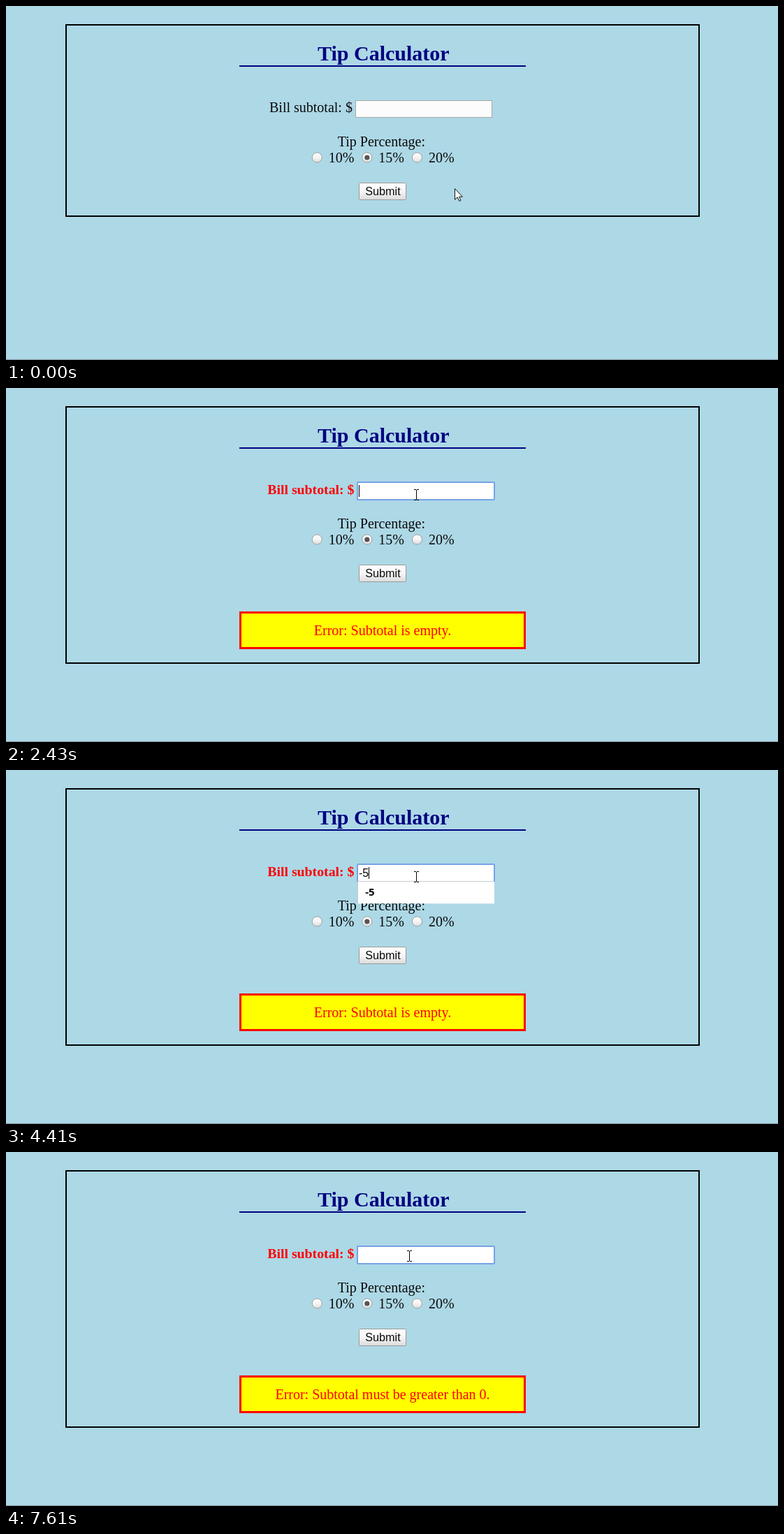
Recreate the animation shown at these times as an HTML page. Size 1105 by 507 pixels, loop 8 s.

```html
<!DOCTYPE html>
<html lang="en">
<head>
<meta charset="utf-8">
<title>Tip Calculator</title>
<style>
  html, body { margin: 0; height: 100%; overflow: hidden; background: #add8e6; }
  svg { display: block; width: 1105px; height: 507px; }
  text { font: 20px "Liberation Serif", serif; fill: #0a0a0a; white-space: pre; }
  .title { font-size: 30px; font-weight: bold; fill: #000080; }
  .sans { font: 16px "Liberation Sans", sans-serif; }
  .option { font: bold 15px "Open Sans", sans-serif; fill: #000; }
  .bad { font-size: 19.8px; font-weight: bold; fill: #f00; }
  .error { fill: #f00; text-anchor: middle; }
</style>
</head>
<body>
<svg viewBox="0 0 1105 507">
  <defs>
    <linearGradient id="face" x2="0" y2="1">
      <stop offset="0" stop-color="#fff"/>
      <stop offset=".5" stop-color="#f5f5f5"/>
      <stop offset="1" stop-color="#dcdcdc"/>
    </linearGradient>
  </defs>
  <rect y="506" width="1105" height="1" fill="#84929a"/>
  <rect id="panel" x="86" y="27" width="906" height="274" fill="none" stroke="#000" stroke-width="2"/>
  <text class="title" x="446" y="78">Tip Calculator</text>
  <path d="M334 86H744" stroke="#000080" stroke-width="2"/>

  <text id="label" y="152">Bill subtotal: $</text>
  <rect id="field"/>
  <text id="value" class="sans" x="505" y="153"></text>
  <rect id="caret" y="139" width="1" height="17"/>

  <text x="474.7" y="201">Tip Percentage:</text>
  <g id="radios"></g>
  <rect x="505.5" y="253.5" width="67" height="24" rx="1" fill="url(#face)" stroke="#9a9a9a"/>
  <text class="sans" x="514.3" y="271" style="font-size:16.2px">Submit</text>

  <g id="errorBox">
    <rect x="335.5" y="321.5" width="407" height="51" fill="#ff0" stroke="#f00" stroke-width="3"/>
    <text id="error" class="error" x="539" y="354"></text>
  </g>
  <g id="menu"></g>

  <path id="arrow" d="M.5 .7V16.3L4.2 12.9 6.8 18.4 9 17.5 6.5 12.2H11.4Z" fill="#fff" stroke="#111"/>
  <path id="beam" d="M0 .5H3M4 .5H7M3.5 1V15M0 15.5H3M4 15.5H7" fill="none" stroke="#000"/>
</svg>
<script>
const $ = id => document.getElementById(id);
const set = (el, attrs) => { for (const k in attrs) el.setAttribute(k, attrs[k]); };
const LOOP = 8000;
const EMPTY = "Error: Subtotal is empty.";
const TOO_LOW = "Error: Subtotal must be greater than 0.";
const MINUS = ["-5", "-3", "-8", "-9", "-0", "-1"];

const arrow = (x, y) => ({ pointer: "arrow", x, y });
const beam = (x, y) => ({ pointer: "beam", x, y });

// Each entry changes part of the state from its time on.
const timeline = [
  [0, { ...arrow(642, 261), error: "", value: "", focus: false, caret: 0, menu: [] }],
  [270, arrow(572, 264)],
  [390, arrow(531, 266)],
  [1670, { error: EMPTY }],
  [1820, arrow(565, 232)],
  [1970, arrow(587, 170)],
  [2130, beam(584, 145)],
  [2430, { focus: true, caret: 505 }],
  [2990, { caret: 0 }],
  [3450, { caret: 505 }],
  [3570, { value: "-", caret: 510, menu: MINUS }],
  [4130, { caret: 0 }],
  [4410, { value: "-5", caret: 519, menu: ["-5"] }],
  [4680, { value: "-54", caret: 528 }],
  [4800, { menu: [] }],
  [4950, arrow(570, 170)],
  [5080, beam(550, 199)],
  [5230, { caret: 0 }],
  [5350, arrow(540, 248)],
  [5500, arrow(538, 253)],
  [5620, arrow(541, 257)],
  [5780, { ...arrow(542, 259), caret: 528 }],
  [6330, { focus: false, caret: 0 }],
  [6480, { value: "", error: TOO_LOW }],
  [6610, arrow(596, 184)],
  [6760, arrow(582, 167)],
  [6880, beam(574, 141)],
  [7020, { focus: true, caret: 505 }],
  [7610, { caret: 0 }]
];

$("radios").innerHTML = ["10%", "15%", "20%"].map((name, i) => {
  const x = 445.2 + i * 71.6;
  const dot = i === 1 ? `<circle cx="${x}" cy="217" r="3.6" fill="#555"/>` : "";
  return `<circle cx="${x}" cy="217" r="7" fill="url(#face)" stroke="#a0a0a0"/>${dot}
    <text x="${x + 16.5}" y="224">${name}</text>`;
}).join("");

function drawMenu(items) {
  const height = items.length * 29.7 + 2.6;
  $("menu").innerHTML = items.length ? `
    <rect x="503" y="159" width="196" height="${height}" fill="#fff"/>
    <path d="M503 159.5H699M503.5 159V${159 + height}" stroke="#c4cdd2"/>` +
    items.map((s, i) => `<text class="option" x="514.3" y="${180 + i * 29.7}">${s}</text>`).join("") : "";
}

function draw(s) {
  const failed = s.error !== "";
  set($("panel"), { height: failed ? 367 : 274 });
  set($("label"), { x: failed ? 374.3 : 377, class: failed ? "bad" : "" });
  set($("field"), s.focus
    ? { x: 503, y: 135, width: 196, height: 25, rx: 1, fill: "#fff", stroke: "#77a3e6", "stroke-width": 2 }
    : { x: failed ? 503.5 : 500.5, y: 135.5, width: 195, height: 24, rx: 0, fill: "#fcfcfc", stroke: "#a9a9a9", "stroke-width": 1 });
  $("value").textContent = s.value;
  set($("caret"), { x: s.caret, visibility: s.caret ? "visible" : "hidden" });
  set($("errorBox"), { visibility: failed ? "visible" : "hidden" });
  $("error").textContent = s.error;
  drawMenu(s.menu);
  for (const name of ["arrow", "beam"]) {
    set($(name), {
      transform: `translate(${s.x} ${s.y})`,
      visibility: s.pointer === name ? "visible" : "hidden"
    });
  }
}

let shown = -1;
const start = performance.now();
function tick() {
  const t = (performance.now() - start) % LOOP;
  const past = timeline.filter(([at]) => at <= t);
  if (past.length !== shown) {
    shown = past.length;
    draw(Object.assign({}, ...past.map(([, change]) => change)));
  }
  requestAnimationFrame(tick);
}
tick();
</script>
</body>
</html>
```
